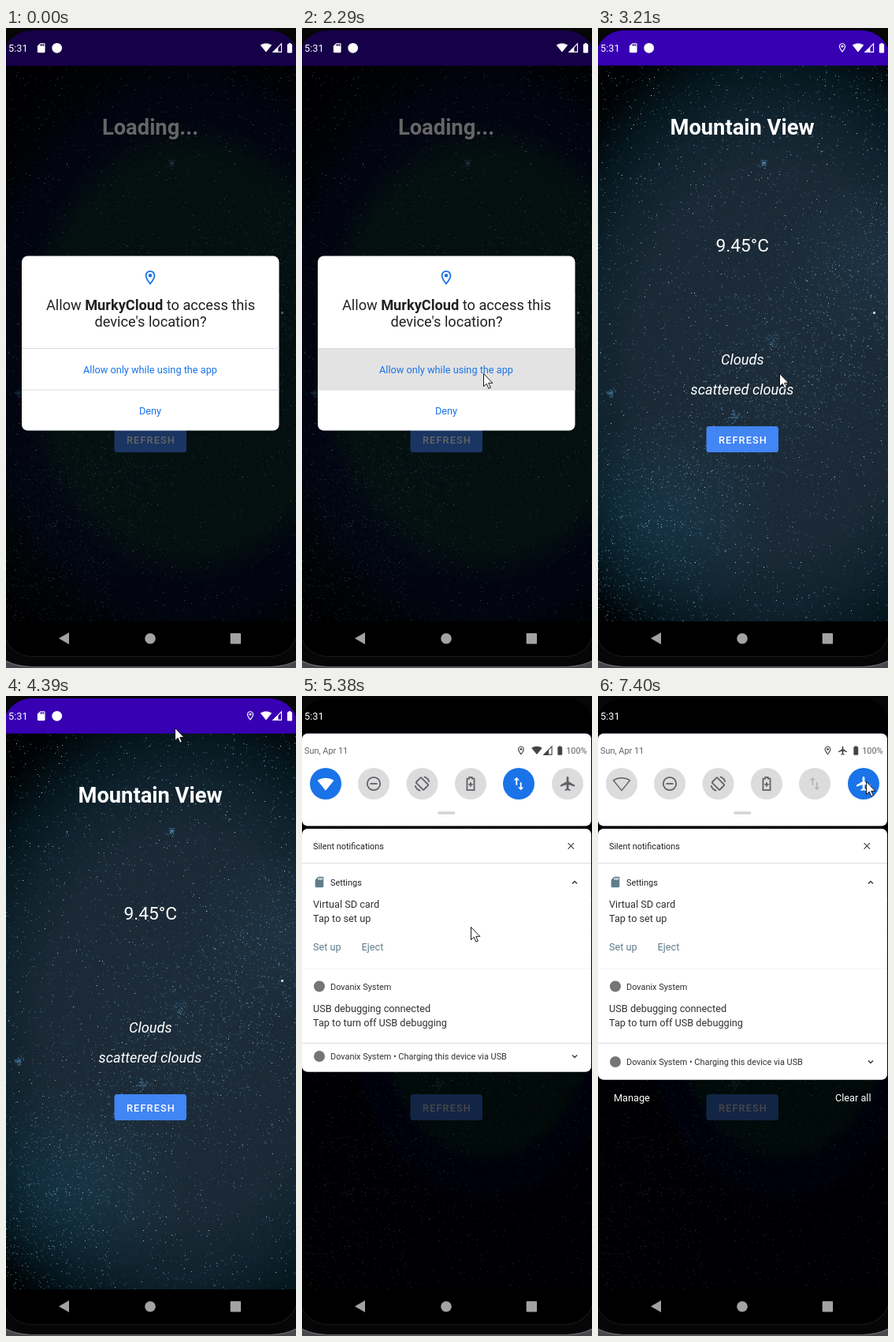
Animation, 368 px wide and 810 px high, one loop 8000 ms. Source, as an HTML page with a canvas:

```html
<!DOCTYPE html>
<html lang="en">
<head>
<meta charset="utf-8">
<title>Weather screen</title>
<style>
html, body { margin: 0; width: 100%; height: 100%; overflow: hidden; background: #000; }
#tone, canvas, svg { position: absolute; left: 0; top: 0; width: 368px; height: 810px; display: block; }
text { font-family: Roboto, "Noto Sans", sans-serif; font-size: 12.73px; white-space: pre; }
.s { font-size: 10.9px; }
.m { font-size: 18.2px; }
.l { font-size: 22.7px; }
.xl { font-size: 27.3px; font-weight: 700; }
.mid { text-anchor: middle; }
.end { text-anchor: end; }
.it { font-style: italic; }
.b { font-weight: 700; }
</style>
</head>
<body>
<div id="tone"></div>
<canvas id="sky" width="368" height="810"></canvas>
<canvas id="stars" width="368" height="810"></canvas>
<svg id="ui" viewBox="0 0 368 810" xmlns="http://www.w3.org/2000/svg"></svg>
<script>
const LOOP = 8000;
const BLUE = '#1a73e8', GREY = '#dcdcdc', INK = '#5f6368', SLATE = '#607d8b';

// [first change, last change, number of changes]
const BURSTS = [
  [520, 600, 2], [830, 1290, 7], [1440, 1750, 5], [1980, 1980, 1], [2210, 2750, 8],
  [3210, 3210, 1], [3990, 4140, 3], [4390, 4390, 1], [4620, 5380, 11],
  [5460, 5920, 7], [6320, 6390, 2], [6620, 6620, 1], [6790, 7400, 9]
];
const STEPS = [0];
for (const [a, b, n] of BURSTS)
  for (let i = 0; i < n; i++) STEPS.push(n > 1 ? a + (b - a) * i / (n - 1) : a);

// Tracks: [time, value, ...]
const POINTER = [
  [520, 246, 663], [600, 234, 622], [830, 233, 606], [1060, 226, 510], [1290, 228, 448],
  [1440, 229, 445], [1750, 230, 437], [3910, 230, 437], [3990, 229, 330], [4066, 225, 165],
  [4140, 221, 73], [4380, 221, 73], [4390, 214, 40], [4620, 214, 46], [5072, 214, 292],
  [5380, 214, 292], [5460, 222, 277], [5690, 295, 165], [5920, 344, 95],
  [6320, 343, 100], [6390, 340, 108]
];
const DIALOG = [[2290, 0, 1], [2364, 60, .92], [2441, 250, .5], [2519, 250, 0]];
const DIM = [[2290, .6], [2364, .5], [2441, .25], [2519, .1], [2596, 0]];
const SHADE = [
  [4545, 47], [4620, 58], [4772, 108], [4924, 172], [5076, 236], [5152, 269],
  [5228, 370], [5304, 440], [5380, 475.5], [5460, 480], [5537, 485.5]
];
const SHADE_DIM = [[47, 0], [165, .3], [269, .52], [475, .72]];
const FOOTER = [[5380, 0], [5460, .3], [5690, 1]];

function track(keys, t) {
  if (t <= keys[0][0]) return keys[0].slice(1);
  for (let i = 1; i < keys.length; i++) {
    const a = keys[i - 1], b = keys[i];
    if (t <= b[0]) {
      const k = (t - a[0]) / (b[0] - a[0]);
      return a.slice(1).map((v, j) => v + (b[j + 1] - v) * k);
    }
  }
  return keys[keys.length - 1].slice(1);
}
const clamp = v => Math.max(0, Math.min(1, v));
const ramp = (t, a, b) => clamp((t - a) / (b - a));
function mix(a, b, k) {
  const part = (c, i) => parseInt(c.slice(i, i + 2), 16);
  return 'rgb(' + [1, 3, 5].map(i => Math.round(part(a, i) + (part(b, i) - part(a, i)) * k)) + ')';
}

function drawSky() {
  const c = document.getElementById('sky').getContext('2d');
  const glow = (x, y, rx, ry, stops) => {
    c.save();
    c.translate(x, y);
    c.scale(rx, ry);
    const g = c.createRadialGradient(0, 0, 0, 0, 0, 1);
    stops.forEach(([p, col]) => g.addColorStop(p, col));
    c.fillStyle = g;
    c.fillRect(-9, -9, 18, 18);
    c.restore();
  };
  c.fillStyle = '#000';
  c.fillRect(0, 0, 368, 810);
  glow(225, 420, 320, 435, [[0, '#1d2c39'], [.55, '#1a2935'], [.72, '#10222d'], [.86, '#05161d'], [1, '#000205']]);
  glow(350, 300, 110, 110, [[0, 'rgba(45,85,115,.18)'], [1, 'rgba(45,85,115,0)']]);
  glow(80, 620, 150, 130, [[0, 'rgba(25,75,100,.35)'], [1, 'rgba(25,75,100,0)']]);
  c.fillStyle = '#000';
  c.fillRect(0, 751, 368, 59);
}

function drawStars() {
  const c = document.getElementById('stars').getContext('2d');
  let seed = 77;
  const rnd = () => (seed = (seed * 16807) % 2147483647) / 2147483647;
  const bell = () => rnd() + rnd() + rnd() - 1.5;
  const dot = (x, y, s, a, col) => {
    c.globalAlpha = a;
    c.fillStyle = col;
    c.fillRect(x, y, s, s);
  };
  const tones = ['#4f93b8', '#6fa9c8', '#3d7da6', '#9cc4d8'];
  for (let i = 0; i < 9500; i++) {
    const band = i % 5 < 2;
    const x = rnd() * 368;
    const y = band ? 690 - x * 1.05 + bell() * 160 : 47 + rnd() * 704;
    dot(x, y, .8 + rnd() * .5, .1 + .75 * rnd() ** 2.2, tones[i % 4]);
  }
  for (let i = 0; i < 380; i++)
    dot(Math.floor(rnd() * 368), 47 + Math.floor(rnd() * 703), 1, .45 + rnd() * .5, '#c4e2f2');
  for (const [x, y, r] of [[209, 171, 5], [221, 395, 11], [173, 491, 7], [16, 462, 5]])
    for (let i = 0; i < 40; i++)
      dot(x + bell() * r, y + bell() * r, 1.2, .25 + rnd() * .5, '#5ea2d0');
  dot(349, 359, 3, .9, '#bfe0f5');
  c.clearRect(0, 751, 368, 59);
}

// Icons on a 24 unit grid; "currentColor" carries the tint
const LINE = 'fill="none" stroke="currentColor" stroke-width="2"';
const ICONS = {
  pin: '<path fill-rule="evenodd" d="M12 2C8.13 2 5 5.13 5 9c0 5.25 7 13 7 13s7-7.75 7-13c0-3.87-3.13-7-7-7zM7 9c0-2.76 2.24-5 5-5s5 2.24 5 5c0 2.88-2.88 7.19-5 9.88C9.92 16.21 7 11.85 7 9z"/><circle cx="12" cy="9" r="2.5"/>',
  plane: '<path d="M22 16v-2l-8.5-5V3.5C13.5 2.67 12.83 2 12 2s-1.5.67-1.5 1.5V9L2 14v2l8.5-2.5V19L8 20.5V22l4-1 4 1v-1.5L13.5 19v-5.5L22 16z"/>',
  battery: '<path d="M15.7 4H14V2h-4v2H8.3C7.6 4 7 4.6 7 5.3v15.4c0 .7.6 1.3 1.3 1.3h7.4c.7 0 1.3-.6 1.3-1.3V5.3c0-.7-.6-1.3-1.3-1.3z"/>',
  card: '<path fill-rule="evenodd" d="M18 2h-8L4 8v12c0 1.1.9 2 2 2h12c1.1 0 2-.9 2-2V4c0-1.1-.9-2-2-2zm-6 6h-2V4h2zm3 0h-2V4h2zm3 0h-2V4h2z"/>',
  wifi: '<path d="M12 21.5L.6 7.5C1 7.2 5.3 4 12 4s11 3.2 11.4 3.5z"/>',
  signal: '<path d="M3 21L21 3V21z" fill="none" stroke="currentColor" stroke-width="2"/><path d="M2 22L14 10V22z"/>',
  quiet: `<g ${LINE}><circle cx="12" cy="12" r="9"/><path d="M7 12h10"/></g>`,
  rotate: `<g ${LINE}><rect x="7" y="4.5" width="10" height="15" rx="1" transform="rotate(-45 12 12)"/><path d="M14.5 2.2Q20.5 4 21.8 9.5M9.5 21.8Q3.5 20 2.2 14.5"/></g>`,
  saver: `<path ${LINE} d="M10 3h4v2h3v16H7V5h3z"/><path ${LINE} d="M12 10v6M9 13h6"/>`,
  data: '<path d="M9 3L5 7h3v7h2V7h3zM16 17v-7h-2v7h-3l4 4 4-4z"/>'
};
const icon = (name, x, y, size, col, id = '') =>
  `<g ${id && `id="${id}"`} color="${col}" fill="currentColor" transform="translate(${x - size / 2} ${y - size / 2}) scale(${size / 24})">${ICONS[name]}</g>`;
const txt = (s, x, y, col, cls = '', id = '') =>
  `<text ${id && `id="${id}"`} x="${x}" y="${y}" fill="${col}" class="${cls}">${s}</text>`;
const box = (x, y, w, h, fill, more = '') =>
  `<rect x="${x}" y="${y}" width="${w}" height="${h}" fill="${fill}" ${more}/>`;
const disc = (x, y, r, fill, more = '') => `<circle cx="${x}" cy="${y}" r="${r}" fill="${fill}" ${more}/>`;
const chevron = (x, y, d) =>
  `<path d="M${x - 3} ${y + d}l3 ${-2 * d}l3 ${2 * d}" fill="none" stroke="#333" stroke-width="1.3"/>`;

const TILES = [['wifi', 30], ['quiet', 91], ['rotate', 152.5], ['saver', 214], ['data', 275], ['plane', 337]];

function build() {
  const app = txt('Loading...', 183, 135, '#fff', 'xl mid', 'loading') +
    `<g id="report">${txt('Mountain View', 183, 135, '#fff', 'xl mid')}${txt('9.45°C', 183.3, 283, '#fff', 'l mid')}` +
    `${txt('Clouds', 183.3, 426, '#fff', 'm it mid')}${txt('scattered clouds', 183, 464, '#fff', 'm it mid')}</g>` +
    box(137.5, 504, 91.5, 33, '#4285f4', 'rx="3.6"') +
    `<text x="184" y="525.5" fill="#fff" class="mid" font-weight="500" letter-spacing="1.14">REFRESH</text>`;

  const status = box(0, 3, 368, 44.5, '#3700b3') + box(0, 3, 368, 44.5, '#000', 'id="barDim"');
  const statusIcons = icon('card', 44.7, 25.2, 14.5, '#fff') + disc(64.7, 25.3, 6.4, '#fff') +
    icon('pin', 310, 25, 14, '#fff', 'gps') + icon('wifi', 330, 24.5, 15, '#fff') +
    icon('signal', 344.3, 25.2, 14, '#fff') + icon('battery', 360, 25.2, 15, '#fff');

  const dialog = box(20, 288.5, 326.5, 221, '#fff', 'rx="7.5"') +
    box(20, 405.5, 326.5, 52.5, '#e3e3e3', 'id="press"') +
    box(20, 405, 326.5, 1, '#dadce0') + box(20, 457.5, 326.5, 1, '#dadce0') +
    icon('pin', 183, 316, 21.8, BLUE) +
    txt('Allow <tspan class="b">MurkyCloud</tspan> to access this', 183.5, 357, '#202124', 'm mid') +
    txt("device's location?", 183.5, 378, '#202124', 'm mid') +
    txt('Allow only while using the app', 183, 437, BLUE, 'mid') + txt('Deny', 183, 489, BLUE, 'mid');

  const quick = box(0, 47.5, 367, 117, '#fff', 'rx="7"') + txt('Sun, Apr 11', 3, 73, INK, 's') +
    `<g id="netOn">${icon('pin', 278, 69, 13.5, '#444')}${icon('wifi', 298, 68.5, 14, '#444')}${icon('signal', 312, 69, 13.5, '#444')}</g>` +
    `<g id="netOff">${icon('pin', 291.5, 69, 13.5, '#444')}${icon('plane', 310.5, 69, 13.5, '#444')}</g>` +
    icon('battery', 327.3, 69, 14, '#444') + txt('100%', 361.5, 73, INK, 's end') +
    disc(337, 111, 26, '#000', 'id="ripple"') +
    TILES.map(([n, x]) => disc(x, 111, 20, GREY, `id="${n}Disc"`) +
      icon(n, x, 111, 21.8, INK, n + 'Icon')).join('') +
    box(172, 146.3, 22.5, 3.4, '#d4d4d4', 'rx="1.7"');

  const list = box(0, 168, 367, 330, '#fff') + txt('Silent notifications', 14, 194, '#202124', 's') +
    '<path d="M337.6 186.2l7.4 7.4M345 186.2l-7.4 7.4" stroke="#444" stroke-width="1.2"/>' +
    box(0, 211, 367, 1, '#dedede') +
    `<g id="cardIcon">${icon('card', 22, 235.5, 16, SLATE)}</g>` +
    `<g id="cardHead">${txt('Settings', 36, 239.5, '#202124', 's')}${chevron(346, 236, 1.5)}</g>` +
    `<g id="shelf">${disc(39.5, 254, 6.3, SLATE)}${disc(59, 254, 1.8, SLATE)}</g>` +
    `<g id="body">${txt('Virtual SD card', 14, 268, '#303134')}${txt('Tap to set up', 14, 285.5, '#303134')}` +
    `${txt('Set up', 14, 321.5, SLATE)}${txt('Eject', 75.5, 321.5, SLATE)}${box(0, 344.5, 367, 1, '#f1f1f1')}` +
    `${disc(22, 367.5, 7, '#757575')}${txt('Dovanix System', 36, 371.5, '#303134', 's')}` +
    `${txt('USB debugging connected', 14, 400, '#303134')}${txt('Tap to turn off USB debugging', 14, 417.5, '#303134')}</g>` +
    box(0, 439, 367, 60, '#fff') + box(0, 439, 367, 1, '#dedede') +
    `<g id="lastRow">${disc(22, 463, 7, '#757575')}${txt('Dovanix System • Charging this device via USB', 36, 467, '#303134', 's')}${chevron(346, 463, -1.5)}</g>`;

  const bezel = '<path fill="#060607" fill-rule="evenodd" d="M0 0H368V810H0zM32.5 3H334.5A36 36 0 0 1 370.5 39V759A36 36 0 0 1 334.5 795H32.5A36 36 0 0 1 -3.5 759V39A36 36 0 0 1 32.5 3z"/>' +
    '<path d="M-3.5 759A36 36 0 0 0 32.5 795.5H334.5A36 36 0 0 0 370.5 759" fill="none" stroke="#1c1c20"/>' +
    '<path d="M0 801Q13 808 34 808.5H334Q355 808 368 801V810H0z" fill="#48484c"/>' +
    '<path d="M0 801Q13 808 34 808.5H334Q355 808 368 801" fill="none" stroke="#6a6a6e" stroke-width="1.2"/>';
  const nav = box(0, 751, 368, 45, '#000') +
    '<path d="M67 772.5L80 765V780z" fill="#a3a3a3"/>' + disc(183, 772.7, 6.8, '#a3a3a3') +
    box(284.7, 766, 13.4, 13.4, '#a3a3a3', 'rx="1"');

  document.getElementById('ui').innerHTML =
    `<defs><clipPath id="cut"><rect id="cutBox" x="0" y="168" width="367" height="0" rx="7"/></clipPath>
      <clipPath id="below"><rect x="0" y="47" width="368" height="704"/></clipPath></defs>` +
    app + box(0, 47, 368, 704, '#000', 'id="dim"') + status + nav +
    `<g id="dialog">${dialog}</g>` +
    `<g id="shade"><g clip-path="url(#below)"><g id="quick">${quick}</g></g><g clip-path="url(#cut)">${list}</g>` +
    `<g id="footer">${txt('Manage', 20, 513, '#fff')}${txt('Clear all', 346.5, 513, '#fff', 'end')}</g></g>` +
    bezel + txt('5:31', 3, 30, '#fff') + `<g id="statusIcons">${statusIcons}</g>` +
    `<g id="pointer">${disc(0, 0, 15, '#ff0', 'id="click" fill-opacity=".47"')}` +
    '<path d="M.5 .5V16.6L4.2 13.2 6.9 19.2 9.4 18.1 6.7 12.3H11.8z" fill="#fff" stroke="#000" stroke-width=".9"/></g>';
}

const set = (id, attrs) => {
  const el = document.getElementById(id);
  for (const k in attrs) el.setAttribute(k, attrs[k]);
};
const fade = (id, v) => set(id, { opacity: v });
const move = (id, x, y) => set(id, { transform: `translate(${x} ${y})` });
const show = (id, on) => fade(id, on ? 1 : 0);

// The darker the scrim, the more the sky falls into a teal disc with a navy rim
function setDim(dim) {
  const size = 1 + (.6 - dim) * 3;
  fade('dim', dim);
  document.getElementById('sky').style.opacity = 1 - clamp(dim * dim * 1.9);
  document.getElementById('tone').style.background =
    `radial-gradient(${265 * size}px ${350 * size}px at 235px 410px, #02251f 0, #02251f 72%, #000028 84%, #000028 94%, #000006 108%)`;
}

function draw(time) {
  const t = STEPS.filter(s => s <= time + 5).pop();
  const [px, py] = track(POINTER, t);
  move('pointer', px, py);
  show('pointer', t >= 520);
  show('click', [[1980, 2200], [4610, 5040], [6610, 6780]].some(([a, b]) => t >= a && t < b));

  const loaded = t >= 3200;
  show('loading', !loaded);
  show('report', loaded);
  show('gps', t >= 2660);

  const [dy, alpha] = track(DIALOG, t);
  move('dialog', 0, dy);
  fade('dialog', alpha);
  fade('press', ramp(t, 2130, 2285));

  const [bottom] = track(SHADE, t);
  const open = bottom > 47;
  const dim = open ? track(SHADE_DIM, bottom)[0] : track(DIM, t)[0];
  setDim(dim);
  fade('barDim', open ? ramp(bottom, 47, 165) : dim);
  fade('statusIcons', 1 - ramp(bottom, 47, 120));
  show('shade', open);
  move('quick', 0, Math.min(0, bottom - 164.5));
  set('cutBox', { height: Math.max(0, bottom - 168) });
  const unfold = ramp(bottom, 269, 380);
  move('cardIcon', 0, -4 * (1 - unfold));
  move('cardHead', 0, -12 * (1 - unfold));
  fade('shelf', 1 - ramp(bottom, 269, 330));
  fade('body', ramp(bottom, 275, 380));
  move('lastRow', 0, -7 * clamp((485.5 - bottom) / 10));
  fade('footer', track(FOOTER, t)[0]);

  const fly = ramp(t, 6790, 7020), off = ramp(t, 6940, 7250);
  set('planeDisc', { fill: mix(GREY, BLUE, fly) });
  set('planeIcon', { color: mix(INK, '#ffffff', fly) });
  set('wifiDisc', { fill: mix(BLUE, GREY, off) });
  set('wifiIcon', { color: mix('#ffffff', INK, off), 'fill-opacity': 1 - off, stroke: 'currentColor', 'stroke-width': 1.6 * off });
  set('dataDisc', { fill: mix(BLUE, GREY, off) });
  set('dataIcon', { color: mix('#ffffff', '#b4b6b8', off) });
  fade('ripple', t >= 6780 ? .1 * (1 - ramp(t, 6866, 7170)) : 0);
  show('netOn', t < 7010);
  show('netOff', t >= 7010);
}

drawSky();
drawStars();
build();
const start = performance.now();
function tick() {
  draw((performance.now() - start) % LOOP);
  requestAnimationFrame(tick);
}
tick();
</script>
</body>
</html>
```
